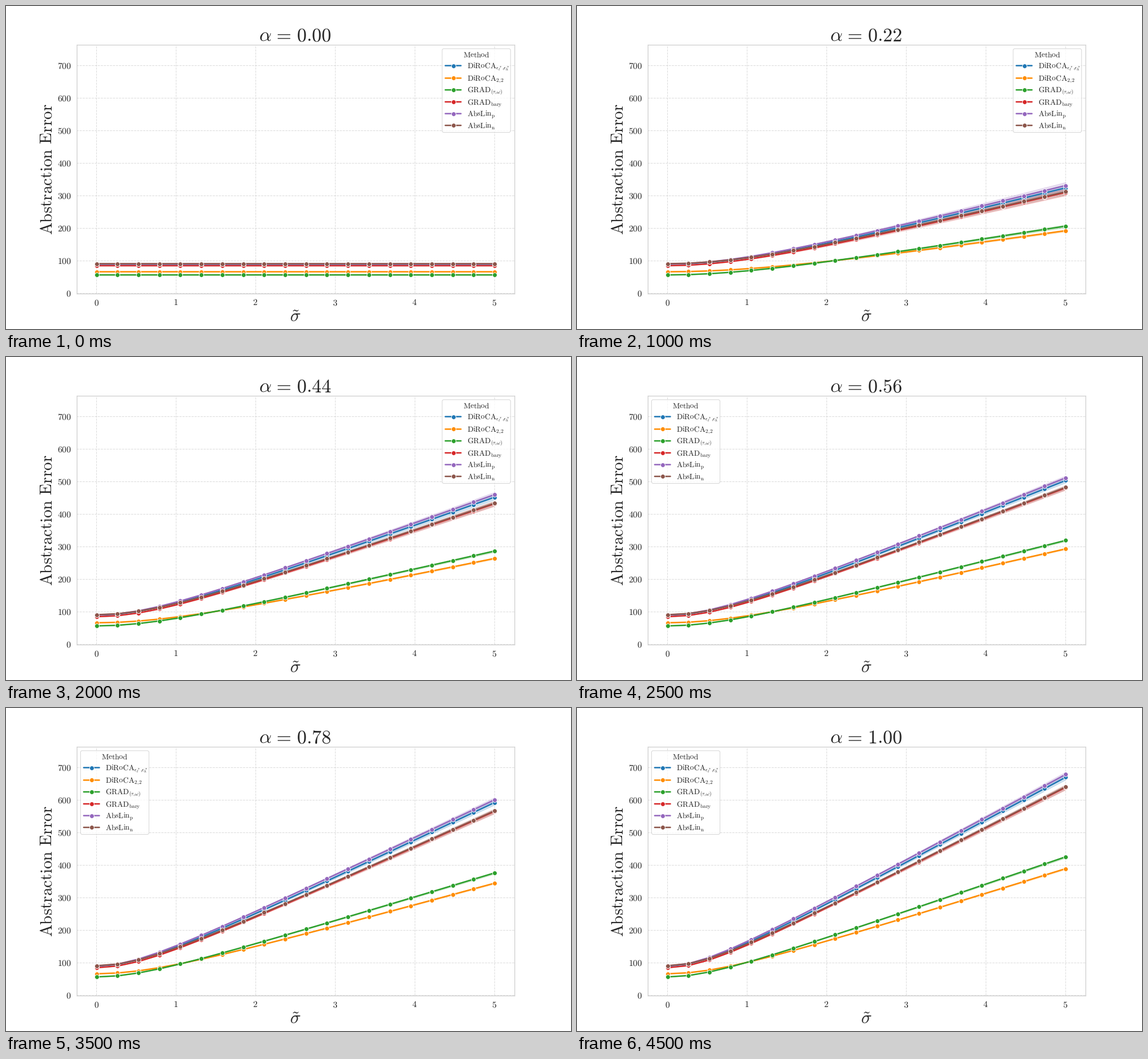
A matplotlib script that plays this animation: 990 px wide and 566 px high, repeating every 5 s.

```python
import numpy as np
import matplotlib.pyplot as plt
from matplotlib.animation import FuncAnimation
from matplotlib.patches import FancyBboxPatch

W, H, DPI = 990, 566, 64
PT = 72 / DPI  # points per pixel
INK = "0.15"
FRAMES = 10

plt.rcParams.update({"mathtext.fontset": "cm", "text.hinting": "none"})

# label, colour, offset, curve floor, squared slope, follows drift, band factor
METHODS = [
    (r"\mathrm{DiRoCA}_{\epsilon_\ell^*\text{,}\epsilon_h^*}", "#1f77b4", 3, 87, 17500, True, 1),
    (r"\mathrm{DiRoCA}_{\text{2,2}}", "#ff8c00", 0, 66.7, 5890, False, 0.6),
    (r"\mathrm{GRAD}_{(\tau\text{,}\omega)}", "#2ca02c", 0, 57, 7120, False, 0.7),
    (r"\mathrm{GRAD}_{\mathrm{bary}}", "#d62728", 6, 79.3, 15780, True, 1),
    (r"\mathrm{AbsLin}_{\mathrm{p}}", "#9467bd", 12, 78.5, 17544, True, 1),
    (r"\mathrm{AbsLin}_{\mathrm{n}}", "#8c564b", 6, 85.5, 15830, True, 1),
]
DRIFT = [1, 0.987, 0.985, 0.985, 1, 1, 1, 1, 1, 1]
SPREAD = [0, 0.045, 0.042, 0.037, 0.021, 0.016, 0.015, 0.014, 0.013, 0.013]

sigma = np.linspace(0, 5, 20)

fig = plt.figure(figsize=(W / DPI, H / DPI), dpi=DPI, facecolor="white")

LEFT, RIGHT, TOP, BOTTOM = 0.125 * W, 0.9 * W, 0.12 * H, 0.89 * H
MID_X, MID_Y = (LEFT + RIGHT) / 2, (TOP + BOTTOM) / 2
ax = fig.add_axes([0.125, 0.11, 0.775, 0.77])
ax.set(xlim=(-0.25, 5.25), ylim=(0, 764))
ax.set_xticks(range(6))
ax.set_yticks(range(0, 701, 100))
ax.set_axisbelow(True)
ax.grid(True, color="0.8", alpha=0.7, linestyle="--", linewidth=1.0 * PT, snap=False)
ax.tick_params(length=0, labelbottom=False, labelleft=False)
for spine in ax.spines.values():
    spine.set(color="0.8", linewidth=1.2 * PT)

# overlay measured in pixels, y pointing down
stage = fig.add_axes([0, 0, 1, 1], zorder=5)
stage.set(xlim=(0, W), ylim=(H, 0))
stage.axis("off")


def label(x, y, tex, size, **kw):
    opts = dict(ha="center", va="baseline", color=INK, zorder=6)
    opts.update(kw)
    return stage.text(x, y, f"${tex}$", fontsize=size * PT, **opts)


def line_style(color):
    return dict(color=color, linewidth=2.5 * PT, marker="o", markersize=7.9 * PT,
                markeredgecolor="white", markeredgewidth=0.9 * PT, snap=False)


def make_legend(x):
    box = FancyBboxPatch((x + 3, 77.8), 113.9, 140.7, boxstyle="round,pad=3,rounding_size=3",
                         facecolor="white", edgecolor="0.8", alpha=0.8,
                         linewidth=1.0 * PT, zorder=3)
    parts = [stage.add_patch(box), label(x + 59.8, 90, r"\mathrm{Method}", 13.4)]
    rows = [104.5, 126.4, 147, 168, 188.6, 209.2]
    for y, (tex, color, *_) in zip(rows, METHODS):
        parts += stage.plot([x + 5.5, x + 19.3, x + 33], [y] * 3, markevery=[1],
                            solid_capstyle="round", zorder=4, **line_style(color))
        parts.append(label(x + 43.6, y + 4.5, tex, 13.4, ha="left"))
    return parts


for k in range(6):
    label(LEFT + (k + 0.25) / 5.5 * (RIGHT - LEFT) - (k > 0), 524.5, str(k), 15.5)
for v in range(0, 701, 100):
    label(114.3, BOTTOM - v / 764 * (BOTTOM - TOP) + 5.2, str(v), 15.5, ha="right")
label(MID_X - 0.5, 553, r"\tilde{\sigma}", 31)
label(82, MID_Y, r"\mathrm{Abstraction}\hspace{0.38}\mathrm{Error}", 29.2,
      rotation=90, rotation_mode="anchor")
title = label(MID_X - 0.6, 62.3, r"\alpha", 33.7)

legends = [make_legend(764.2), make_legend(130.6)]
lines = [ax.plot(sigma, sigma, zorder=2, **line_style(m[1]))[0] for m in METHODS]
bands = []


def draw(i):
    alpha = i / (FRAMES - 1)
    title.set_text(rf"$\alpha\hspace{{0.1166}}=\hspace{{0.1166}}{alpha:.2f}$")
    while bands:
        bands.pop().remove()
    for line, (_, color, base, floor, slope, drifts, wide) in zip(lines, METHODS):
        gain = slope * (DRIFT[i] if drifts else 1)
        err = base + np.sqrt(floor ** 2 + alpha * gain * sigma ** 2)
        half = (err - err[0]) * SPREAD[i] * wide
        line.set_ydata(err)
        bands.append(ax.fill_between(sigma, err - half, err + half, color=color,
                                     alpha=0.2, linewidth=1.0 * PT, zorder=1))
    for side, parts in enumerate(legends):
        for part in parts:
            part.set_visible(side == (i >= FRAMES // 2))
    return lines + bands + [title]


anim = FuncAnimation(fig, draw, frames=FRAMES, init_func=lambda: draw(0),
                     interval=500, repeat=True, repeat_delay=0, blit=False)
plt.show()
```
